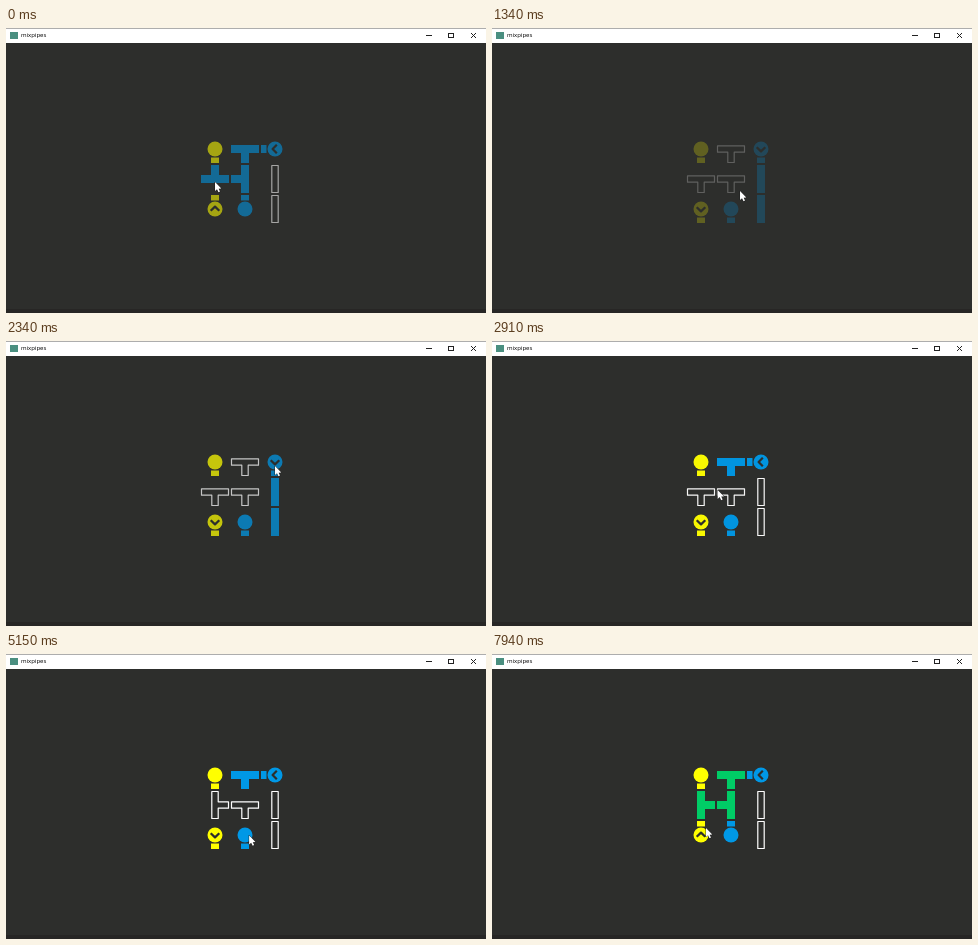
Write an HTML page with a canvas that moves like this. It is 480 by 285 pixels and loops after 8000 ms.

```html
<!DOCTYPE html>
<html lang="en">
<head>
<meta charset="utf-8">
<title>mixpipes</title>
<style>
  html, body { margin: 0; width: 100%; height: 100%; overflow: hidden; background: #2d2e2c; }
  canvas { position: absolute; left: 0; top: 0; }
  #title { position: absolute; left: 15px; top: 3px; font: 6px/9px "Open Sans", sans-serif; color: #000; }
</style>
</head>
<body>
<canvas id="stage" width="480" height="285"></canvas>
<div id="title">mixpipes</div>
<script>
const ctx = document.getElementById('stage').getContext('2d');
const LOOP = 8000, RESET = 1000;
const BG = '#2d2e2c', YELLOW = '#ffff00', BLUE = '#0098e6', GREEN = '#00cc66';
const FLOW = [null, YELLOW, BLUE, GREEN]; // indexed by mask: 1 yellow, 2 blue

// Sides: 0 down, 1 left, 2 up, 3 right; a click turns a piece clockwise by one.
const SIDES = [[0, 1], [-1, 0], [0, -1], [1, 0]];
const OPEN = { end: [0], tee: [0, 1, 3], bar: [0, 2] };
const BOARD = [
  { kind: 'end', mask: 1 }, { kind: 'tee' }, { kind: 'end', mask: 2, source: true },
  { kind: 'tee' }, { kind: 'tee' }, { kind: 'bar' },
  { kind: 'end', mask: 1, source: true }, { kind: 'end', mask: 2 }, { kind: 'bar' }
];
const START = [0, 0, 1, 2, 1, 0, 2, 2, 0];
const CLICKS = [ // time, cell
  [210, 3], [2450, 2], [3210, 3], [3490, 3], [3780, 3],
  [5570, 7], [5860, 7], [6590, 4], [7600, 6], [7900, 6]
];
const MOUSE = [ // time, x, y
  [0, 209, 154], [420, 213, 154], [800, 221, 157], [1340, 248, 163], [1900, 264, 142],
  [2340, 269, 125], [2500, 269, 125], [3050, 211, 157], [3230, 212, 160], [4290, 212, 160],
  [4320, 216, 162], [4550, 196, 178], [4800, 220, 185], [5120, 244, 182], [5340, 238, 178],
  [5860, 238, 178], [5950, 240, 177], [6140, 240, 177], [6430, 244, 159], [7200, 244, 159],
  [7620, 214, 174], [LOOP, 214, 174]
];

function turnsAt(t) {
  const turns = t < RESET ? [...START] : Array(9).fill(0);
  for (const [time, cell] of CLICKS)
    if (time <= t && (time >= RESET) === (t >= RESET)) turns[cell]++;
  return turns;
}

function flowMasks(turns) {
  const masks = Array(9).fill(0);
  const isOpen = (i, side) => OPEN[BOARD[i].kind].some(s => (s + turns[i]) % 4 === side);
  function spread(i, mask) {
    SIDES.forEach(([dx, dy], side) => {
      const x = i % 3 + dx, y = Math.floor(i / 3) + dy, next = y * 3 + x;
      if (x < 0 || x > 2 || y < 0 || y > 2 || !isOpen(i, side)) return;
      if (BOARD[next].kind === 'end' || masks[next] & mask || !isOpen(next, (side + 2) % 4)) return;
      masks[next] |= mask;
      spread(next, mask);
    });
  }
  BOARD.forEach((piece, i) => piece.source && spread(i, piece.mask));
  return masks;
}

function trace(points, close) {
  ctx.beginPath();
  points.forEach(([x, y]) => ctx.lineTo(x, y));
  if (close) ctx.closePath();
}

function pipe(kind, color) {
  const w = color ? 4 : 3.2, l = color ? 14 : 13.5;
  trace(kind === 'bar'
    ? [[-w, -l], [w, -l], [w, l], [-w, l]]
    : [[-l, -w], [l, -w], [l, w], [w, w], [w, l], [-w, l], [-w, w], [-l, w]], true);
  if (color) {
    ctx.fillStyle = color;
    ctx.fill();
  } else {
    ctx.strokeStyle = '#fff';
    ctx.lineWidth = 1.2;
    ctx.stroke();
  }
}

function terminal({ mask, source }) {
  ctx.fillStyle = FLOW[mask];
  ctx.beginPath();
  ctx.arc(0, 0, 7.5, 0, 7);
  ctx.fill();
  ctx.fillRect(-4, 8.5, 8, 5.5);
  if (!source) return;
  ctx.globalAlpha = 1;
  ctx.strokeStyle = BG;
  ctx.lineWidth = 2.2;
  trace([[-4.3, -1.8], [0, 2.4], [4.3, -1.8]]);
  ctx.stroke();
}

function drawBoard(t) {
  const turns = turnsAt(t), masks = flowMasks(turns);
  const alpha = Math.min(1, Math.abs(t - RESET) / 2000) ** 0.8;
  BOARD.forEach((piece, i) => {
    ctx.save();
    ctx.globalAlpha = alpha;
    ctx.lineJoin = 'round';
    ctx.translate(209 + i % 3 * 30, 121 + Math.floor(i / 3) * 30);
    ctx.rotate(turns[i] * Math.PI / 2);
    if (piece.kind === 'end') terminal(piece);
    else pipe(piece.kind, FLOW[masks[i]]);
    ctx.restore();
  });
}

function drawWindow() {
  ctx.fillStyle = BG;
  ctx.fillRect(0, 0, 480, 285);
  ctx.fillStyle = '#272625';
  ctx.fillRect(0, 281, 480, 4);
  ctx.fillStyle = '#fff';
  ctx.fillRect(0, 0, 480, 15);
  ctx.fillStyle = '#777';
  ctx.fillRect(0, 0, 480, 0.6);
  ctx.fillStyle = '#4a8f80';
  ctx.fillRect(4, 4, 8, 7);
  ctx.strokeStyle = '#222';
  ctx.lineWidth = 1;
  ctx.strokeRect(442.5, 5.5, 5, 4);
  trace([[420, 7.5], [426, 7.5]]);
  ctx.stroke();
  trace([[465, 5], [470, 10]]);
  ctx.stroke();
  trace([[470, 5], [465, 10]]);
  ctx.stroke();
}

function drawMouse(t) {
  const k = MOUSE.findIndex(key => key[0] > t);
  const [t0, x0, y0] = MOUSE[k - 1], [t1, x1, y1] = MOUSE[k];
  const p = (t - t0) / (t1 - t0);
  ctx.save();
  ctx.translate(x0 + (x1 - x0) * p, y0 + (y1 - y0) * p);
  trace([[0, 0], [0, 9], [2, 7.2], [3.5, 10.3], [5, 9.6], [3.6, 6.7], [6.3, 6.5]], true);
  ctx.strokeStyle = '#1b1b1b';
  ctx.lineWidth = 0.8;
  ctx.stroke();
  ctx.fillStyle = '#fff';
  ctx.fill();
  ctx.restore();
}

function draw() {
  const t = performance.now() % LOOP;
  drawWindow();
  drawBoard(t);
  drawMouse(t);
  requestAnimationFrame(draw);
}
draw();
</script>
</body>
</html>
```
